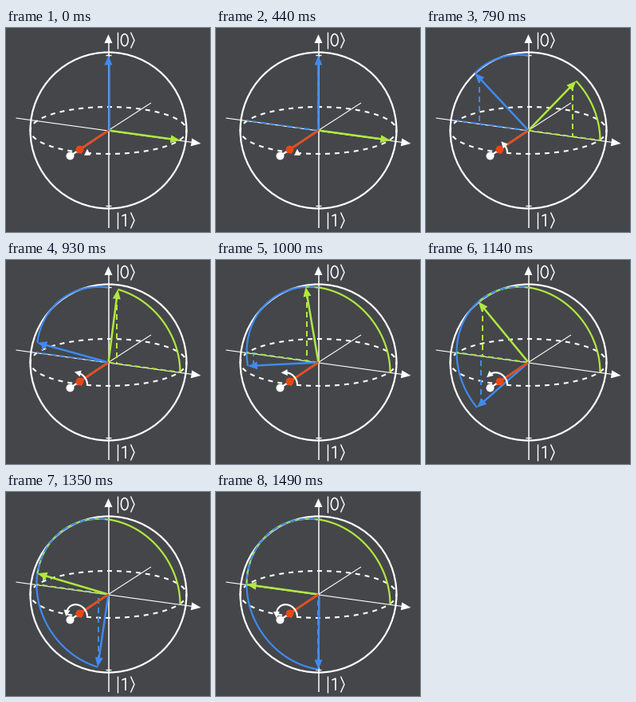
These frames come from a looping animation (256 by 256 pixels, 1830 ms). A matplotlib script:

```python
import numpy as np
import matplotlib.pyplot as plt
from matplotlib.animation import FuncAnimation
from matplotlib.patches import Circle, Ellipse, Polygon

SIZE, DPI = 256, 64
PX = 72 / DPI
LOOP, STEP = 1830, 10
START, HOLD, STEPS = 440, 70, 16

BG, WHITE = "#454649", "#ffffff"
BLUE, GREEN, RED = "#3f8af0", "#b0e840", "#ee4511"

O = np.array([128.5, 128.5])
Y = np.array([90.0, 12.4])
Z = np.array([0.0, -94.0])
HUB = np.array([89.0, 155.0])

fig = plt.figure(figsize=(SIZE / DPI, SIZE / DPI), dpi=DPI, facecolor=BG)
ax = fig.add_axes([0, 0, 1, 1])
ax.set_xlim(0, SIZE)
ax.set_ylim(SIZE, 0)
ax.axis("off")


def line(pts, color, width, z, dash=None, phase=0):
    pts = np.asarray(pts, float).reshape(-1, 2)
    style = "-"
    if dash:
        style = (phase / width, tuple(d / width for d in dash))
    return ax.plot(pts[:, 0], pts[:, 1], color=color, lw=width * PX, ls=style,
                   zorder=z, solid_capstyle="butt", dash_capstyle="butt")[0]


def head_points(tip, direction, length, half):
    d = np.asarray(direction, float)
    d = d / np.hypot(*d)
    n = np.array([-d[1], d[0]])
    base = np.asarray(tip) - d * length
    return np.array([tip, base + n * half, base - n * half])


def head(tip, direction, length, half, color, z):
    shape = Polygon(head_points(tip, direction, length, half), fc=color,
                    ec="none", zorder=z)
    return ax.add_patch(shape)


def dot(x, y, r, color, z):
    ax.add_patch(Circle((x, y), r, fc=color, ec="none", zorder=z))


def on_ring(a, center=O, scale=1.0):
    """Points at angle a from +y toward +z."""
    a = np.atleast_1d(a)[:, None]
    return center + scale * (np.cos(a) * Y + np.sin(a) * Z)


def ket(y, digit):
    line([(140, y - 10), (140, y + 11)], WHITE, 1.4, 3)
    line([(156.5, y - 9.5), (161, y + 0.5), (156.5, y + 10.5)], WHITE, 1.4, 3)
    if digit == 0:
        ax.add_patch(Ellipse((148.8, y), 8.8, 15, fc="none", ec=WHITE,
                             lw=1.6 * PX, zorder=3))
    else:
        line([(145.5, y - 5), (150, y - 7), (150, y + 8)], WHITE, 1.6, 3)


# Sphere, equator and axes
ax.add_patch(Circle(O, 98, fc="none", ec=WHITE, lw=2.2 * PX, zorder=2))
turn = np.linspace(0, 2 * np.pi, 200)
line(O + np.c_[98 * np.cos(turn), 29.5 * np.sin(turn)], WHITE, 2.1, 2,
     (6, 6), 3)
line([(128.5, 14), (128.5, 251)], WHITE, 1.5, 3)
head((128.5, 8), (0, -1), 11, 5, WHITE, 3)
for y in (34, 223):
    line([(125, y), (132, y)], WHITE, 1.4, 3)
line([(12.5, 113), (236, 143.8)], WHITE, 1.1, 3)
head((244.5, 145), Y, 12, 5, WHITE, 3)
line([(182, 94), O], WHITE, 1.1, 3)
line([O, (80.5, 160.5)], WHITE, 2.2, 3)
dot(80.5, 160.5, 5, WHITE, 8)
line([O, (92.5, 152.5)], RED, 2.4, 7)
dot(92.5, 152.5, 4.9, RED, 8)
ket(15, 0)
ket(241, 1)


class Vector:
    def __init__(self, color, start, z):
        self.start = start
        self.arc = line([O, O], color, 2.2, z)
        self.drop = line([O, O], color, 2, z, (7, 5))
        self.base = line([O, O], color, 1.8, z, (7, 4))
        self.shaft = line([O, O], color, 2.5, z + 2)
        self.head = head(O, (1, 0), 12, 5, color, z + 2)

    def pose(self, theta, moving, side):
        a = self.start + theta
        tip = on_ring(a)[0]
        ray = tip - O
        end = tip - ray / np.hypot(*ray) * 11
        self.shaft.set_data(*np.array([O, end]).T)
        self.head.set_xy(head_points(tip, ray, 12, 5))
        self.arc.set_data(*on_ring(np.linspace(self.start, a, 60)).T)
        foot = O + 0.92 * np.cos(a) * Y
        self.drop.set_data(*np.array([O + 0.92 * ray, foot]).T)
        self.base.set_data(*np.array([O, O + side * Y]).T)
        for part in (self.arc, self.drop, self.base):
            part.set_visible(moving)


green = Vector(GREEN, 0, 4)
blue = Vector(BLUE, np.pi / 2, 4)
green.base.set_zorder(4.5)
shared = line([O, O], GREEN, 1.4, 5, (5, 7))
spin = line([O, O], WHITE, 2.2, 9)
spin_head = head(HUB, (0, -1), 8, 4, WHITE, 9)


def update(i):
    t = i * STEP
    k = 0 if t < START else min(STEPS, 1 + (t - START) // HOLD)
    u = max(0.0, 1 - (STEPS - k) * 0.066)
    theta = np.pi * u * u * (3 - 2 * u)
    moving = k > 0

    green.pose(theta, moving, 1 if theta < np.pi / 2 else -1)
    blue.pose(theta, moving, -1)

    # Stretch covered by both trails
    over = max(theta, np.pi / 2)
    shared.set_data(*on_ring(np.linspace(np.pi / 2, over, 40)).T)
    shared.set_visible(theta > np.pi / 2)

    spin.set_data(*on_ring(np.linspace(0, theta, 40), HUB, 0.145).T)
    at = on_ring(theta, HUB, 0.145)[0]
    way = -np.sin(theta) * Y + np.cos(theta) * Z
    way = way / np.hypot(*way)
    spin_head.set_xy(head_points(at + way * 5, way, 8, 4))
    return []


anim = FuncAnimation(fig, update, frames=LOOP // STEP, interval=STEP,
                     repeat=True, repeat_delay=0, blit=False)
plt.show()
```
